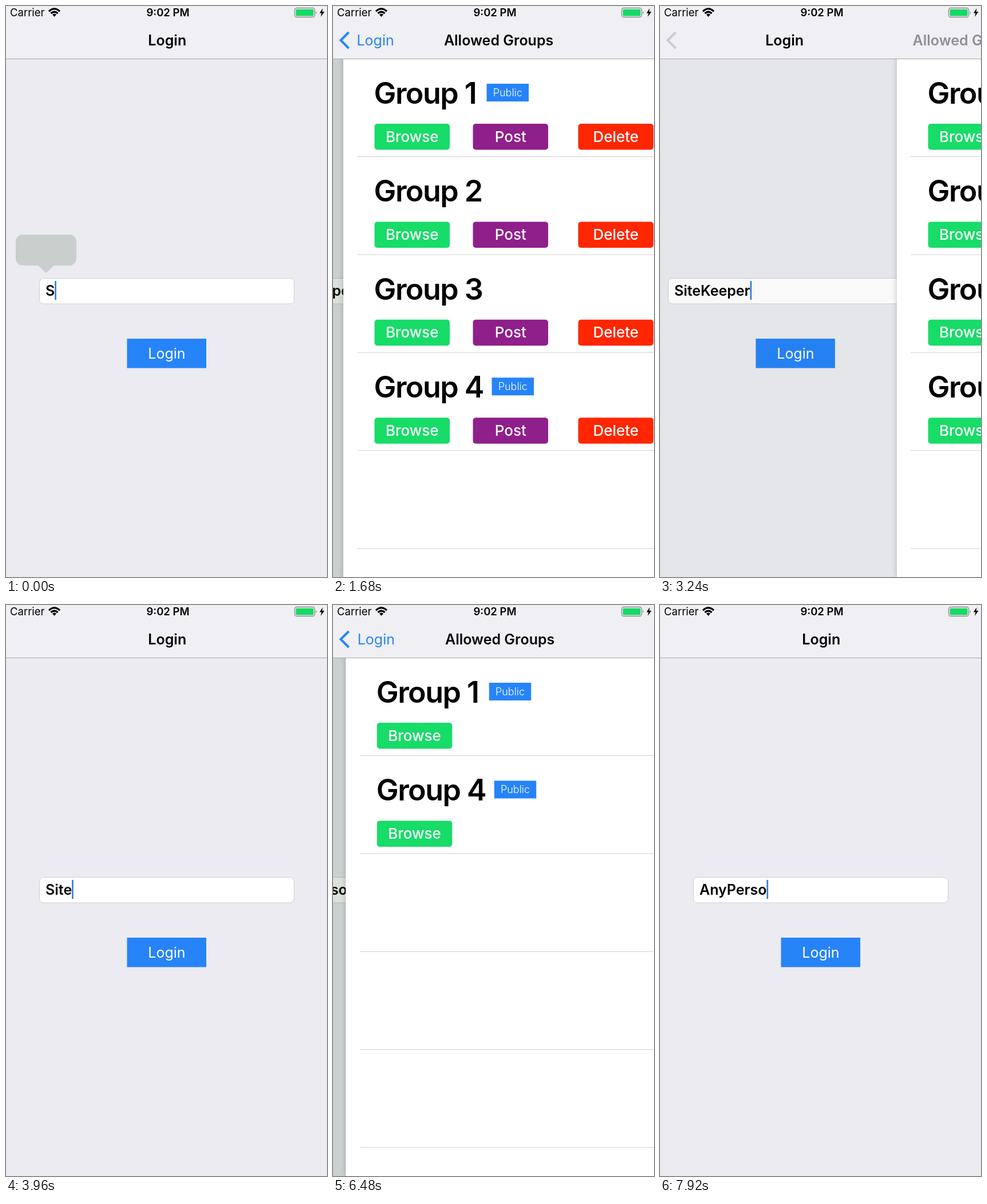
Write an HTML page that moves like this. It is 561 px wide and 999 px high and loops after 8 s.

```html
<!DOCTYPE html>
<html lang="en">
<head>
<meta charset="utf-8">
<title>Group list login</title>
<style>
  html, body { margin: 0; width: 100%; height: 100%; overflow: hidden; background: #ebebf1; }
  svg { display: block; width: 100vw; height: 100vh; font-family: Inter, Roboto, sans-serif; font-size: 26px; }
  text { white-space: pre; }
  .semi { font-weight: 600; }
  .title { font-size: 25px; font-weight: 600; }
  .back { font-size: 25px; }
  .status { font-size: 18.5px; }
  .name { font-size: 52px; font-weight: 600; letter-spacing: -.03em; }
  .mid { text-anchor: middle; fill: #fff; }
  .btn { font-weight: 500; }
  .tag { font-size: 18px; font-weight: 300; }
  #list { filter: drop-shadow(-1px 0 4px rgba(0, 0, 0, .18)); }
</style>
</head>
<body>
<svg viewBox="0 0 561 999" preserveAspectRatio="none">
  <g id="login">
    <rect width="561" height="999" fill="#ebebf1"/>
    <g id="bubble" fill="#c9cfcd">
      <rect x="17" y="400" width="106" height="54" rx="12"/>
      <path d="M55 453h30l-15 14z"/>
    </g>
    <rect x="58.5" y="476.5" width="445" height="44.5" rx="7" fill="#fff" stroke="#cfcfd4"/>
    <text id="user" class="semi" x="69" y="507" style="font-size:25px"></text>
    <rect id="caret" y="481" width="2.6" height="33" fill="#3478dc"/>
    <rect x="211.5" y="582" width="138.5" height="51.5" fill="#2684f8"/>
    <text class="mid" x="281" y="617" style="font-size:25px">Login</text>
  </g>
  <rect id="dim" width="561" height="999" fill="#002300"/>
  <g id="list">
    <rect width="561" height="999" fill="#fff"/>
    <g id="rows"></g>
  </g>

  <rect width="561" height="93" fill="#efeff4"/>
  <path d="M0 92.5H561" stroke="#a6a6ab"/>
  <path id="chevron" d="M27.500 46L13.500 60L27.500 74" fill="none" stroke-width="4"/>
  <text id="back" class="back" y="69">Login</text>
  <text id="loginTitle" class="title" y="68.500">Login</text>
  <text id="listTitle" class="title" y="68.500" text-anchor="middle">Allowed Groups</text>

  <text class="status" x="7" y="18">Carrier</text>
  <text class="status semi" x="283" y="18" text-anchor="middle">9:02 PM</text>
  <g fill="none" stroke="#000" stroke-width="3.200">
    <path d="M75 9.300Q84.500 0.500 94 9.300M78.500 13Q84.500 7.500 90.500 13"/>
    <path d="M81 15Q84.500 12 88 15L84.500 19z" fill="#000" stroke="none"/>
  </g>
  <rect x="504.500" y="3.500" width="35" height="16" rx="3.500" fill="none" stroke="#8c8c90" stroke-width="1.300"/>
  <rect x="506.500" y="5.700" width="31" height="11.800" rx="1.500" fill="#17d964"/>
  <path d="M541.500 9q3 2.500 0 5.500z" fill="#8c8c90"/>
  <path d="M553.500 4L548 12.500H551.500L550 19L556.500 10H552.500z"/>
</svg>
<script>
const $ = id => document.getElementById(id);
const set = (id, attrs) => { for (const k in attrs) $(id).setAttribute(k, attrs[k]); };
const clamp = v => Math.min(1, Math.max(0, v));

const LOOP = 8000, WIDTH = 561, ROW = 171.4;
const ADMIN = 'SiteKeeper', GUEST = 'AnyPerson';
const PUSHES = [1388, 6202], POPS = [3095, 7535];

function button(x, y, label, color) {
  return `<rect x="${x}" y="${y}" width="131.500" height="45.500" rx="5" fill="${color}"/>
    <text class="mid btn" x="${x + 65.75}" y="${y + 31.5}">${label}</text>`;
}

function row(n, i, admin) {
  const y = i * ROW, tagX = { 1: 250.5, 4: 259.5 }[n];
  let out = `<text class="name" x="53.500" y="${y + 171}">Group ${n}</text>`;
  if (tagX) out += `<rect x="${tagX}" y="${y + 136}" width="73.500" height="31" fill="#2684f8"/>
    <text class="mid tag" x="${tagX + 36.75}" y="${y + 158}">Public</text>`;
  out += button(54.5, y + 206, 'Browse', '#17dc68');
  if (admin) out += button(226.5, y + 206, 'Post', '#8f1f8a') + button(410.5, y + 206, 'Delete', '#ff2600');
  return out;
}

function rows(admin) {
  let out = (admin ? [1, 2, 3, 4] : [1, 4]).map((n, i) => row(n, i, admin)).join('');
  for (let i = 0; i < 5; i++) out += `<path d="M24 ${263.5 + i * ROW}H561" stroke="#d0d0d4"/>`;
  return out;
}

// Critically damped spring from 0 to 1, cut off at its end.
function spring(ms, end) {
  if (ms <= 0) return 0;
  if (ms >= end) return 1;
  const k = ms * .018;
  return 1 - (1 + k) * Math.exp(-k);
}

const keys = (t, start, step) => t < start ? 0 : 1 + Math.floor((t - start) / step);

function typed(t) {
  if (t < 3470) return ADMIN.slice(0, keys(t, 0, 110));
  if (t < 5150) return ADMIN.slice(0, Math.max(0, 10 - keys(t, 3470, 92)));
  return GUEST.slice(0, t < 7900 ? keys(t, 5150, 110) : 8);
}

let shownAdmin;
function draw(t) {
  const cycle = t < 4500 ? 0 : 1, admin = cycle === 0;
  const popping = t >= POPS[cycle];
  const p = spring(t - PUSHES[cycle], 900) - spring(t - POPS[cycle], 375);
  const x = WIDTH * (1 - p);

  if (admin !== shownAdmin) {
    $('rows').innerHTML = rows(admin);
    shownAdmin = admin;
  }
  $('user').textContent = typed(t);
  set('caret', { x: 69 + $('user').getComputedTextLength() });
  set('bubble', { opacity: clamp(1 - t / 180) });

  set('login', { transform: `translate(${-.3 * WIDTH * p})` });
  set('dim', { opacity: .14 * clamp((p - .15) / .6) });
  set('list', { transform: `translate(${x})`, visibility: p > 0 ? 'visible' : 'hidden' });

  const labelX = 36 + .3 * x + .00014 * x * x;
  const tint = popping ? '#c9cccf' : '#2684f8';
  set('chevron', { stroke: tint, opacity: clamp(p * 4) });
  set('back', { x: labelX, fill: tint, opacity: clamp((p - .4) / .5) });
  set('loginTitle', { x: labelX, opacity: clamp(1 - (p - .3) / .5) });
  set('listTitle', { x: 281 + .47 * x + .00036 * x * x, opacity: Math.pow(clamp(p), .7) });
}

const begin = performance.now();
function tick(now) {
  draw(Math.max(0, now - begin) % LOOP);
  requestAnimationFrame(tick);
}
draw(0);
requestAnimationFrame(tick);
</script>
</body>
</html>
```
